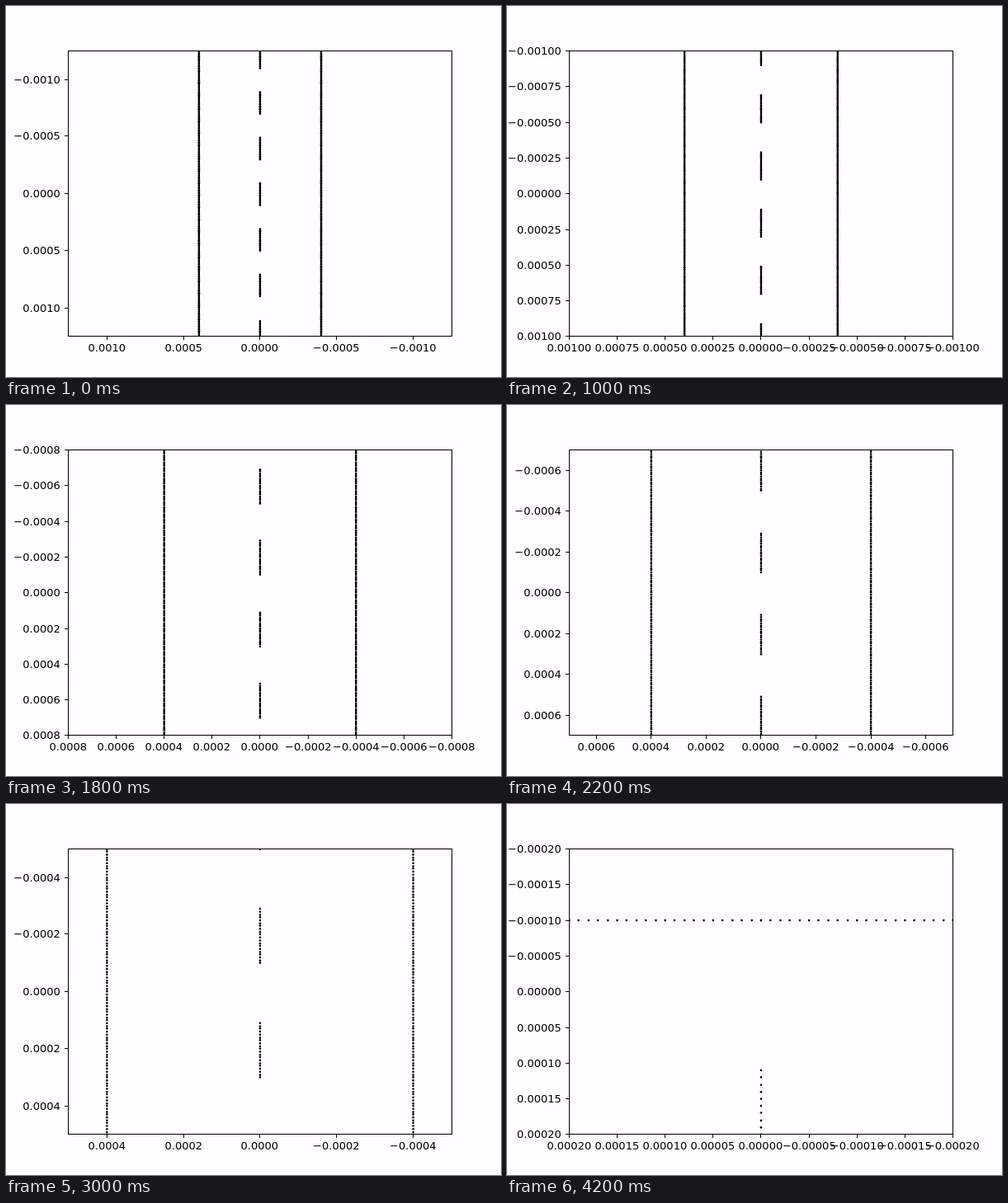
These frames come from a looping animation (600x450 px, 4400 ms). An HTML page with a canvas:

```html
<!DOCTYPE html>
<html lang="en">
<head>
<meta charset="utf-8">
<title>Road plot</title>
<style>
  html, body { margin: 0; width: 100%; height: 100%; overflow: hidden; background: #fffdff; }
  canvas { display: block; }
</style>
</head>
<body>
<canvas id="plot" width="600" height="450"></canvas>
<script>
const ctx = document.getElementById('plot').getContext('2d');
const STEP_MS = 200, STEPS = 22;
const LEFT = 75, RIGHT = 540, TOP = 54, BOTTOM = 400.5;
const GRID = 0.9375; // markers sit on the pixels of a 640 by 480 grid
const mod = (a, n) => ((a % n) + n) % n;
const snap = p => (Math.round(p / GRID) + 0.5) * GRID;

// Plot values are integers in units of 0.00001.
function draw(step) {
  const limit = 125 - 5 * step;
  const roadEnd = -10 - 20 * (STEPS - 1 - step);
  const px = v => snap((LEFT + RIGHT) / 2 - v * (RIGHT - LEFT) / 2 / limit);
  const py = v => snap((TOP + BOTTOM) / 2 + v * (BOTTOM - TOP) / 2 / limit);

  ctx.fillStyle = '#fffdff';
  ctx.fillRect(0, 0, 600, 450);
  ctx.fillStyle = '#000';

  ctx.save();
  ctx.beginPath();
  ctx.rect(LEFT, TOP, RIGHT - LEFT, BOTTOM - TOP);
  ctx.clip();
  const dot = (x, y) => {
    ctx.beginPath();
    ctx.arc(px(x), py(y), 1.3, 0, 2 * Math.PI);
    ctx.fill();
  };
  for (let y = Math.max(-limit, roadEnd); y <= limit; y++) {
    dot(-40, y);
    dot(40, y);
    if (mod(y + 9 - 20 * step, 40) < 20) dot(0, y);
  }
  if (roadEnd >= -limit) for (let x = -40; x <= 40; x++) dot(x, roadEnd);
  ctx.restore();

  ctx.strokeRect(LEFT + 0.5, TOP + 0.5, RIGHT - LEFT, Math.floor(BOTTOM) - TOP);
  drawTicks(limit, px, py);
}

function drawTicks(limit, px, py) {
  const gap = [5, 10, 20, 25, 50].find(s => s >= 2 * limit / 9);
  const digits = gap % 10 ? 5 : 4;
  ctx.font = '13.02px "DejaVu Sans", sans-serif';
  for (let v = -Math.floor(limit / gap) * gap; v <= limit; v += gap) {
    const label = (v < 0 ? '\u2212' : '') + (Math.abs(v) / 1e5).toFixed(digits);
    const x = Math.floor(px(v)), y = Math.floor(py(v));
    ctx.fillRect(x, 401, 1, 4);
    ctx.fillRect(LEFT - 4, y, 4, 1);
    ctx.textAlign = 'center';
    ctx.fillText(label, x + 0.3, 419);
    ctx.textAlign = 'right';
    ctx.fillText(label, 65.8, y + 5);
  }
}

let shown = -1;
function tick() {
  const step = Math.floor(performance.now() / STEP_MS) % STEPS;
  if (step !== shown) draw(shown = step);
  requestAnimationFrame(tick);
}
tick();
</script>
</body>
</html>
```
